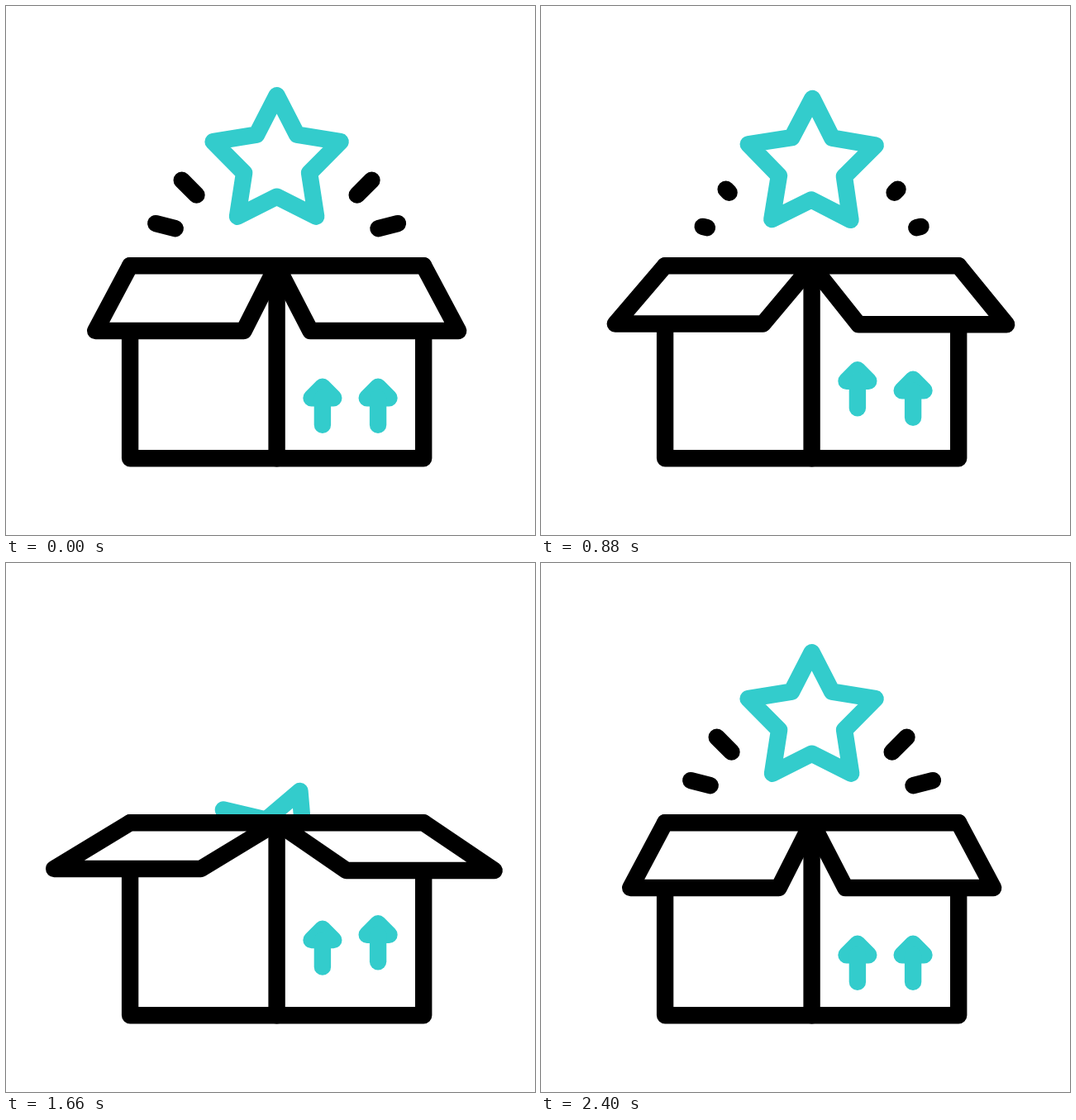
Write an HTML page with a canvas that moves like this. It is 640 by 640 pixels and loops after 2.42 s.

```html
<!DOCTYPE html>
<html lang="en">
<head>
<meta charset="utf-8">
<title>Open box with star</title>
<style>
  html, body { margin: 0; width: 100%; height: 100%; overflow: hidden; background: #fff; }
  canvas { display: block; width: 640px; height: 640px; }
</style>
</head>
<body>
<canvas id="stage" width="640" height="640"></canvas>
<script>
const ctx = document.getElementById('stage').getContext('2d');
const BLACK = '#000', TEAL = '#33cccc', WHITE = '#fff';
const CENTER = 327.6, TOP = 314.2, BOTTOM = 547.2, LEFT = 150.1, RIGHT = 505.2;
const STEP = 20, STEPS = 121, TIMELINE = 130;

const lerp = (a, b, k) => a + (b - a) * k;

// Eased progress from 0 to 1 between two timeline positions.
function ease(f, from, to) {
  const u = Math.min(1, Math.max(0, (f - from) / (to - from)));
  return u * u * (3 - 2 * u);
}

// Rises for one span, falls back over the next, twice in a row.
function swing(f, start, span = 30) {
  const at = n => start + n * span;
  return ease(f, at(0), at(1)) - ease(f, at(1), at(2))
       + ease(f, at(2), at(3)) - ease(f, at(3), at(4));
}

function shape(points, color, { closed = false, fill } = {}) {
  ctx.beginPath();
  points.forEach(([x, y]) => ctx.lineTo(x, y));
  if (closed) ctx.closePath();
  if (fill) {
    ctx.fillStyle = fill;
    ctx.fill();
  }
  ctx.strokeStyle = color;
  ctx.stroke();
}

function drawStar(f) {
  const cycle = f < 60 ? f : f - 60;
  const drop = ease(cycle, 0, 20) - ease(cycle, 20, 50);
  const points = Array.from({ length: 10 }, (_, i) => {
    const r = i % 2 ? 41.5 : 81;
    const a = i * Math.PI / 5;
    return [r * Math.sin(a), 7.7 - r * Math.cos(a)];
  });
  ctx.save();
  ctx.beginPath();
  ctx.rect(0, 0, 640, TOP);
  ctx.clip();
  ctx.translate(CENTER, 181.5 + 218 * drop);
  ctx.rotate(drop * Math.PI / 6);
  shape(points, TEAL, { closed: true });
  ctx.restore();
}

function burstState(f) {
  if (f < 20) {
    const k = ease(f, 0, 20);
    return { from: k, to: 1, shift: 10.4 * k };
  }
  if (f < 72) return { from: ease(f, 40, 70), to: ease(f, 35, 65), shift: 0 };
  return { from: 0, to: ease(f, 110, 130), shift: 0 };
}

function drawBursts(f) {
  const { from, to, shift } = burstState(f);
  if (to <= from) return;
  // Offsets are measured from the vertical axis, inner end first.
  const rays = [[97.1, 228.6, 114.9, 210.7], [122.9, 269.2, 146.4, 263.1]];
  for (const side of [-1, 1]) {
    for (const [x1, y1, x2, y2] of rays) {
      const point = k => [CENTER + side * (lerp(x1, x2, k) + shift), lerp(y1, y2, k) - shift];
      shape([point(from), point(to)], BLACK);
    }
  }
}

function drawArrow(x, lift) {
  const y = 474.2 - lift;
  shape([[x - 13.4, y], [x, y - 13.4], [x + 13.4, y]], TEAL, { closed: true, fill: TEAL });
  shape([[x, y], [x, y + 32.5]], TEAL);
}

function drawBox(f) {
  const open = swing(f, 0);
  shape([[LEFT, TOP], [RIGHT, TOP], [RIGHT, BOTTOM], [LEFT, BOTTOM]], BLACK, { closed: true, fill: WHITE });

  const leftY = 393 - 23 * open, rightY = 393 - 21 * open;
  shape([[LEFT, TOP], [CENTER, TOP], [287.7 - 52 * open, leftY], [108.2 - 50 * open, leftY]],
    BLACK, { closed: true, fill: WHITE });
  shape([[CENTER, TOP], [RIGHT, TOP], [547.2 + 43.5 * open, rightY], [368.3 + 43.5 * open, rightY]],
    BLACK, { closed: true, fill: WHITE });
  shape([[CENTER, TOP], [CENTER, BOTTOM]], BLACK);

  drawArrow(382.9, 24.5 * swing(f, 10));
  drawArrow(450.1, 24.5 * open);
}

function draw(ms) {
  const f = Math.floor(ms / STEP) % STEPS * TIMELINE / (STEPS - 1);
  ctx.fillStyle = WHITE;
  ctx.fillRect(0, 0, 640, 640);
  ctx.lineWidth = 20.4;
  ctx.lineCap = ctx.lineJoin = 'round';
  drawStar(f);
  drawBursts(f);
  drawBox(f);
}

const start = performance.now();
function tick() {
  draw(performance.now() - start);
  requestAnimationFrame(tick);
}
tick();
</script>
</body>
</html>
```
